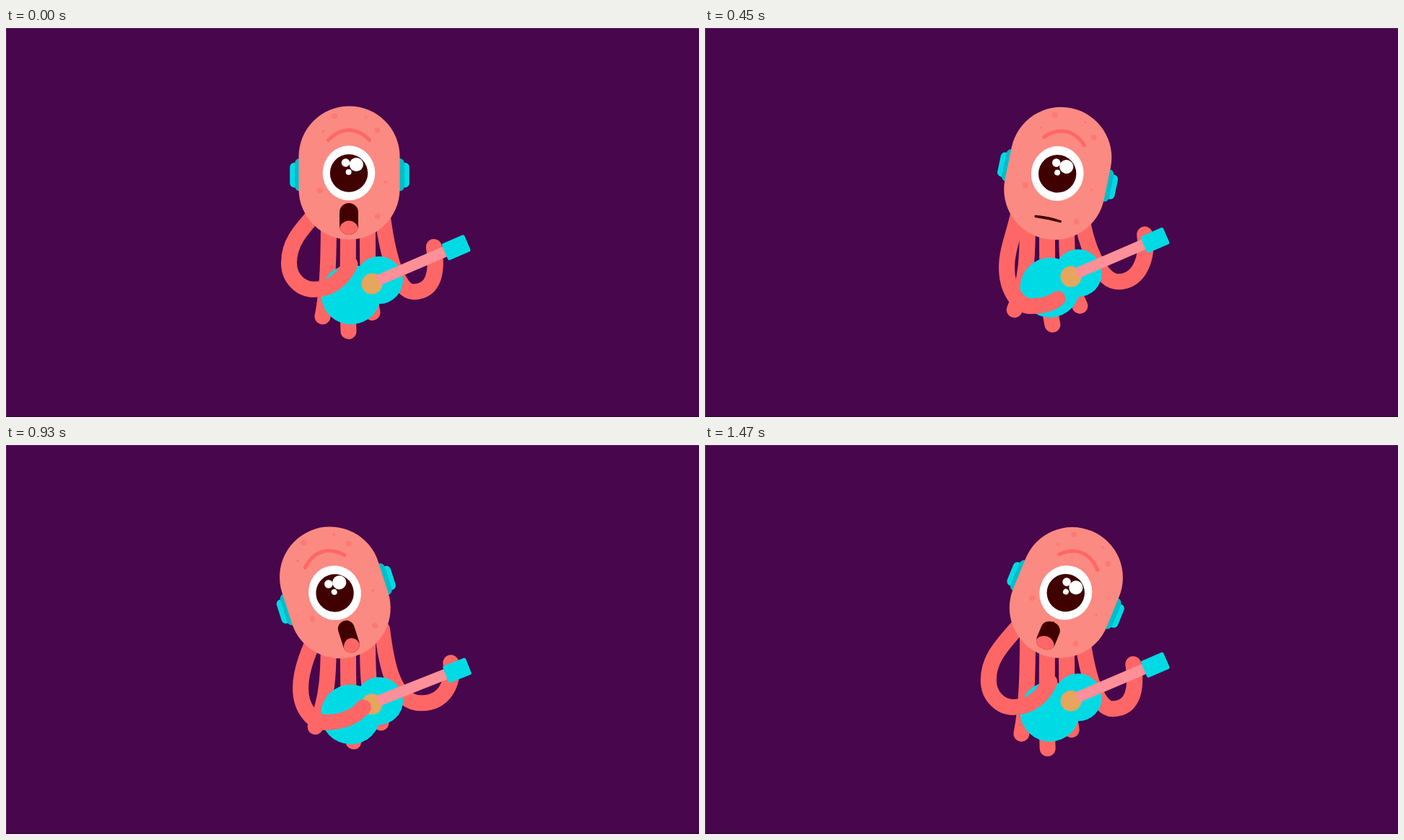
Animation of 960 by 540 pixels, one loop 1.5 s. Source, as an HTML page with a canvas:

```html
<!DOCTYPE html>
<html lang="en">
<head>
<meta charset="utf-8">
<title>Guitar monster</title>
<style>
  html, body { margin: 0; width: 100%; height: 100%; overflow: hidden; background: #48064c; }
  canvas { display: block; width: 960px; height: 540px; }
</style>
</head>
<body>
<canvas id="stage" width="960" height="540"></canvas>
<script>
const ctx = document.getElementById('stage').getContext('2d');
const LOOP = 1500, STEP = 30;
const BACK = '#48064c', SKIN = '#fb8a82', LIMB = '#ff6767', SPOT = '#fc7a74', CYAN = '#00dae5',
      TEAL = '#00bdca', DARK = '#400000', WOOD = '#e6a65c', NECK = '#ff8f98';

// Eases like a pendulum between turning points given as [time, value].
const swing = (...turns) => t => {
  const next = turns.findIndex(([time]) => time > t);
  if (next < 0) return turns[turns.length - 1][1];
  const [t0, v0] = turns[next - 1], [t1, v1] = turns[next];
  return v0 + (v1 - v0) * (1 - Math.cos(Math.PI * (t - t0) / (t1 - t0))) / 2;
};

const headTilt = swing([0, 0], [140, -19], [535, 15.5], [890, -19], [1240, 22.3]);
const guitarTilt = swing([0, -23.3], [130, -15.5], [320, -22.5], [740, -27], [1150, -15], [LOOP, -23.3]);
const guitarBob = swing([0, 0], [350, -10.5], [1200, 9.3], [LOOP, 0]);
const neckSlide = swing([0, 99], [270, 121], [450, 117], [690, 130], [1200, 114], [LOOP, 99]);
const strumX = swing([0, -30.5], [700, -14], [1260, -9], [LOOP, -30.5]);
const strumY = swing([0, -27], [470, 31], [700, -11], [960, 5], [1240, 5], [LOOP, -27]);
const armDrop = swing([0, 0], [460, 1], [700, 0.4], [1230, 0.95], [LOOP, 0]);
const legSpread = swing([0, 0], [60, 0], [480, 1], [700, 0.08], [940, 1], [1150, 0.95], [LOOP, 0]);
const legStretch = swing([0, 0], [960, 0], [1230, 16], [LOOP, 0]);
const mouthOpen = swing([0, 1], [270, 0.95], [450, 0.1], [690, 0.38], [930, 1.04], [1260, 0.55], [1470, 0.92]);
const mouthWidth = swing([0, 26], [270, 25], [450, 38], [690, 26], [930, 23], [1260, 37], [1470, 27]);

function disc(x, y, rx, color, ry = rx) {
  ctx.fillStyle = color;
  ctx.beginPath();
  ctx.ellipse(x, y, rx, ry, 0, 0, 7);
  ctx.fill();
}

function slab(x, y, w, h, r, color) {
  ctx.fillStyle = color;
  ctx.beginPath();
  ctx.roundRect(x, y, w, h, r);
  ctx.fill();
}

function tube(start, curves, width = 22) {
  ctx.strokeStyle = LIMB;
  ctx.lineWidth = width;
  ctx.lineCap = ctx.lineJoin = 'round';
  ctx.beginPath();
  ctx.moveTo(...start);
  for (const c of curves) ctx.bezierCurveTo(...c);
  ctx.stroke();
}

function turned(x, y, degrees, draw) {
  ctx.save();
  ctx.translate(x, y);
  ctx.rotate(degrees * Math.PI / 180);
  draw();
  ctx.restore();
}

function drawLegs(t) {
  const spread = legSpread(t), drop = legStretch(t) - 9.5 * spread;
  const leg = (hip, x, y, sway) => {
    const footY = y + drop;
    tube([hip, 262], [[hip, 315, hip - 1, footY - 37, x + sway * spread, footY]]);
  };
  leg(447, 438.5, 400.5, -10);
  leg(474, 474.5, 421, 7);
  leg(501, 507.5, 395, 12);
}

// The hand slides along the neck and the rest of the arm follows it.
function drawRightArm(t) {
  const slide = neckSlide(t), bob = guitarBob(t), angle = guitarTilt(t) * Math.PI / 180;
  const handX = 507 + slide * Math.cos(angle) + 13 * Math.sin(angle);
  const handY = 355 + bob + slide * Math.sin(angle) - 13 * Math.cos(angle);
  const dipX = 520 + slide * 0.45, dipY = 244 + handY / 2 - slide * 0.3;
  tube([521, 256], [
    [526, 296, 538 - bob * 0.75, dipY, dipX, dipY],
    [dipX + 30, dipY, handX + 5, handY + 31, handX, handY]
  ]);
}

function drawLeftArm(t) {
  const drop = armDrop(t), bob = guitarBob(t);
  const elbowX = 392 + 26 * drop, elbowY = 326 + 13 * drop + bob * 0.7;
  const wristX = 426 + 25 * drop, wristY = 363 + 30 * drop + bob * 0.7;
  const handX = 507 + strumX(t), handY = 355 + bob + strumY(t);
  const reach = handX - wristX, rise = wristY - handY;
  tube([436, 250], [
    [elbowX + 11, 285, elbowX, elbowY - 25, elbowX, elbowY],
    [elbowX, elbowY + (wristY - elbowY) * 0.6, (elbowX + wristX) / 2, wristY, wristX, wristY],
    [wristX + reach / 2, wristY, handX - reach * 0.18, handY + rise * 0.55, handX, handY]
  ]);
}

function drawGuitar(t) {
  turned(507, 355 + guitarBob(t), guitarTilt(t), () => {
    disc(-32.6, 2.3, 41.5, CYAN);
    disc(11, -0.6, 33, CYAN);
    disc(0, 0, 14.5, WOOD);
    slab(9, -8.5, 105, 15, 0, NECK);
    slab(110, -12.5, 34, 25, 2.5, CYAN);
  });
}

function drawMouth(t) {
  const open = mouthOpen(t), half = mouthWidth(t) / 2;
  const top = 265 - 22 * open, bottom = 265 + 22 * open;
  const arch = Math.max(0, 14 * open * (1 - open)), shoulder = top + arch;
  const round = Math.min(13 * open ** 1.5 + 0.5, half, (bottom - shoulder) / 2);
  ctx.save();
  ctx.translate(475, 0);
  ctx.beginPath();
  ctx.moveTo(-half, (shoulder + bottom) / 2);
  ctx.arcTo(-half, shoulder, half, shoulder, round);
  ctx.quadraticCurveTo(0, top - arch, half - round, shoulder);
  ctx.arcTo(half, shoulder, half, bottom, round);
  ctx.arcTo(half, bottom, -half, bottom, round);
  ctx.quadraticCurveTo(0, bottom - arch, round - half, bottom);
  ctx.arcTo(-half, bottom, -half, shoulder, round);
  ctx.closePath();
  ctx.fillStyle = DARK;
  ctx.fill();
  ctx.clip();
  if (open > 0.2) disc(0, 265 + 15.5 * open, half, LIMB, 13 * open);
  ctx.restore();
}

function drawEye() {
  disc(475, 201.3, 36.3, '#fff', 38);
  disc(475, 201.5, 26.2, DARK);
  disc(485.3, 189.5, 9.6, '#fff');
  disc(470.5, 187, 5.8, '#fff');
  disc(474.6, 200, 4, '#fff');
}

function drawHead(t) {
  turned(478, 266, headTilt(t), () => {
    ctx.translate(-478, -266);
    for (const side of [-1, 1]) {
      slab(468.5 + side * 75.3, 187, 15, 34.5, 6, CYAN);
      slab(468.5 + side * 68.5, 181, 15, 45.5, 7, TEAL);
    }
    slab(405.5, 108.5, 140, 185, 70, SKIN);
    for (const [x, y, r] of [[455, 122, 4], [498.5, 124, 2], [514, 142, 4], [439.5, 143.5, 2],
                             [434.5, 226, 4], [526, 214, 2], [514.5, 261.5, 4]]) disc(x, y, r, SPOT);
    tube([446.5, 155.5], [[464, 137, 486, 137, 503.5, 155.5]], 5);
    drawEye();
    drawMouth(t);
  });
}

function drawBackdrop() {
  ctx.fillStyle = BACK;
  ctx.fillRect(0, 0, 960, 540);
  ctx.fillStyle = 'rgba(255,255,255,.13)';
  ctx.fillRect(0, 0, 960, 1);
  ctx.fillRect(0, 1, 1, 538);
  ctx.fillStyle = 'rgba(0,0,0,.3)';
  ctx.fillRect(0, 539, 960, 1);
}

function frame() {
  const t = Math.floor((performance.now() % LOOP) / STEP) * STEP;
  drawBackdrop();
  drawLegs(t);
  drawRightArm(t);
  drawGuitar(t);
  drawLeftArm(t);
  drawHead(t);
  requestAnimationFrame(frame);
}
frame();
</script>
</body>
</html>
```
